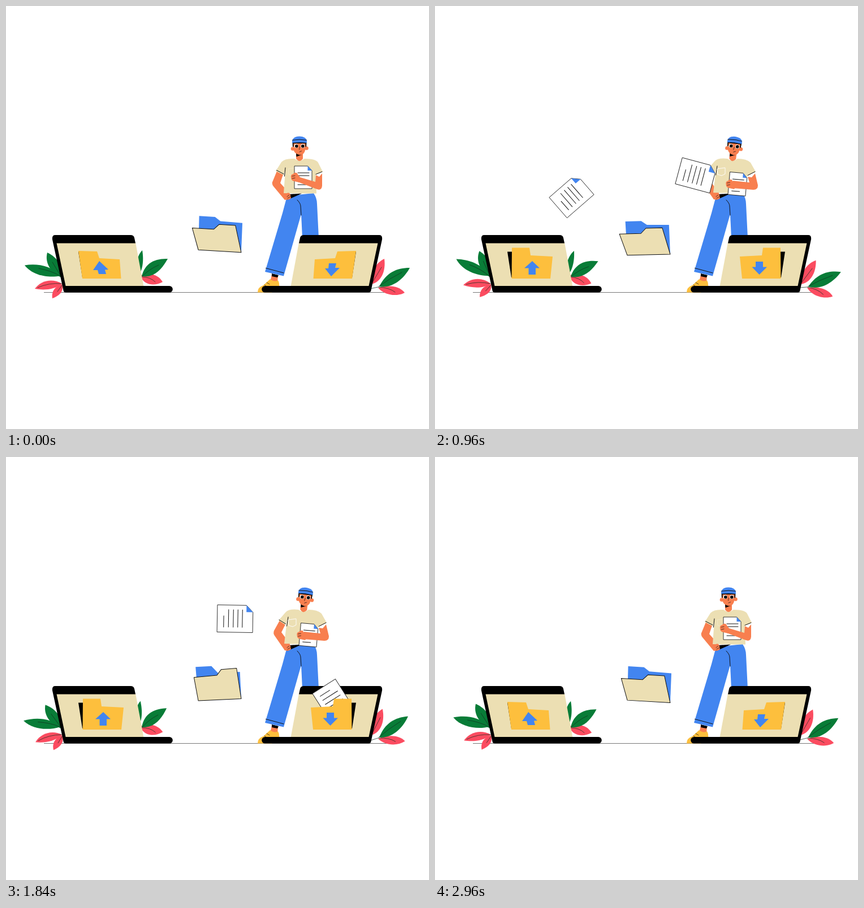
These frames come from a looping animation (748 by 748 pixels, 3040 ms). An HTML page:

```html
<!DOCTYPE html>
<html lang="en">
<head>
<meta charset="utf-8">
<title>File transfer</title>
<style>
  html, body { margin: 0; width: 100%; height: 100%; overflow: hidden; background: #fff; }
  svg { display: block; width: 100%; height: 100%; }
  .green { fill: #087c37; }
  .pink { fill: #fb4c60; }
  .blue { fill: #4285f0; }
  .yellow { fill: #fdbf3d; }
  .sand { fill: #ecdfb3; }
  .skin { fill: #f87f4f; }
  .paper { fill: #fff; stroke: #222; stroke-width: .9; stroke-linejoin: round; }
  .line { fill: none; stroke: #111; stroke-width: 1; stroke-linecap: round; stroke-linejoin: round; }
  .thin { stroke-width: .7; }
  .rib { fill: none; stroke: #12301f; stroke-width: .7; stroke-linecap: round; }
  #hoverFront { fill: #ecdfb3; }
</style>
</head>
<body>
<svg viewBox="0 0 748 748" xmlns="http://www.w3.org/2000/svg">
  <defs>
    <clipPath id="slots"><path d="M0 0H748V438H611V481H136V438H0Z"/></clipPath>
    <g id="laptop">
      <path class="sand" d="M88 418H229L243.500 496H104Z"/>
      <path d="M87 405H220Q226 405 227 410L229 419.500H89.500L105.500 495H289A5.800 5.800 0 0 1 289 506.600H106Q102 506.600 101.500 503L82 413Q81 405 87 405Z"/>
    </g>
    <path id="folderBack" d="M128 434.500H158L163 449L198 451L201 480H135Z"/>
    <g id="sheet">
      <path class="paper" d="M-31.500 -24H20L31.500 -12V24H-31.500Z"/>
      <path class="blue" d="M20 -24L31.500 -12H20Z"/>
      <path class="line" d="M-20 -5V15M-11.500 -16V15M-3 -16V15M5 -16V15M13 -16V15"/>
    </g>
  </defs>

  <path d="M67 506.500H680" fill="none" stroke="#777" stroke-width="1.200"/>

  <g class="leaf" data-sway="7.5,98,480">
    <path class="green" d="M73 436C68 455 80 472 98 480C102 462 92 445 73 436Z"/>
    <path class="rib" d="M82 453L96 476"/>
  </g>
  <g class="leaf" data-sway="11.4,95,478">
    <path class="green" d="M33 458.500C55 455 80 459 96 477C78 481 48 478 33 458.500Z"/>
    <path class="rib" d="M58 464Q80 468 95 477"/>
  </g>
  <g class="leaf" data-sway="8.5,98,490">
    <path class="pink" d="M51 500C62 485 82 481 99 491C86 502 66 503 51 500Z"/>
    <path class="rib" d="M56 498Q76 489 98 491"/>
  </g>
  <g class="leaf" data-sway="7.5,100,492">
    <path class="pink" d="M82 517C80 505 86 496 99 492C103 504 95 512 82 517Z"/>
    <path class="rib" d="M91 505L99 494"/>
  </g>
  <g class="leaf" data-sway="6.5,233,480">
    <path class="green" d="M241 432C233 440 228 455 230 480C242 472 244 450 241 432Z"/>
  </g>
  <g class="leaf" data-sway="4,238,480">
    <path class="pink" d="M277 488C268 473 252 472 238 476C240 490 258 498 277 488Z"/>
    <path class="rib" d="M240 479Q255 479 264 488"/>
  </g>
  <g class="leaf" data-sway="5.5,238,478">
    <path class="green" d="M286 447C262 446 245 456 240 478C262 481 276 465 286 447Z"/>
    <path class="rib" d="M270 458Q252 466 241 478"/>
  </g>
  <g class="leaf" data-sway="6.5,645,492">
    <path class="pink" d="M669 447C653 455 645 470 646 492C664 488 672 468 669 447Z"/>
    <path class="rib" d="M664 462L646 492"/>
  </g>
  <g class="leaf" data-sway="8.8,658,498">
    <path class="pink" d="M705 507C695 494 675 493 658 498C668 511 690 515 705 507Z"/>
    <path class="rib" d="M644 500L658 497Q678 498 688 506"/>
  </g>
  <g class="leaf" data-sway="7.8,658,497">
    <path class="green" d="M714 463C690 463 672 472 660 496C685 500 705 480 714 463Z"/>
    <path class="rib" d="M700 471Q678 482 659 496"/>
  </g>

  <g id="person">
    <path class="skin" d="M470 475L481 478L480 488H467Z"/>
    <path d="M470 473L482 476L480 480L470 478Z"/>
    <path class="yellow" d="M445 506.500Q445 497 455 494L467 483Q475 489 481 485Q484 490 483 499L470 506.500Z"/>
    <path class="line thin" d="M461 489L466 492M457 493L461 496"/>
    <path class="blue" d="M497 336L544 331Q550 340 550 350L553 410H524L522 368L491 477.500L458 470L489 366Z"/>
    <path class="line" d="M459.500 463.500L491 472M515 343Q521 349 521 354L522 370"/>
    <path class="skin" id="hipArm"/>
    <path class="sand" id="shirt"/>
    <path d="M499 333L523 331.500L503 340.500L497 343Z"/>
    <path class="skin" d="M494 333Q500 327 503 334L504 340Q498 345 492 341Z"/>
    <path class="line thin" d="M497 337L501 334M498 340L503 337"/>
    <path class="line" id="seams"/>
    <path id="pocket" d="M499 288L513 286V297L507 300L500 298Z" fill="none" stroke="#fff" stroke-width="1"/>
    <g id="head">
      <path class="skin" d="M513 256H525V270Q519 278 513 270Z"/>
      <path d="M513 259L523 263L513.500 266.500Z"/>
      <circle class="skin" cx="507" cy="252.500" r="3.300"/>
      <circle class="skin" cx="531.500" cy="251.500" r="3.300"/>
      <path d="M506.500 240H531.500L531 249H507Z"/>
      <path class="skin" d="M508.500 243H529.500V253Q528 263 520 263.500Q510 262 508.500 254Z"/>
      <path class="blue" d="M506 242Q505 231 519 230.500Q533 231 532 242Q519 240.500 506 242Z"/>
      <path class="line" d="M506.500 237.200Q519 235 531.500 237.200"/>
      <circle cx="513.200" cy="247.600" r="3.500" fill="#fff"/>
      <circle cx="524.800" cy="247.600" r="3.500" fill="#fff"/>
      <circle cx="513.800" cy="247.800" r="2.800"/>
      <circle cx="524.800" cy="247.800" r="2.800"/>
      <path class="line thin" d="M510 242.500H515M523 242.500H528M519.500 249L518.500 254M519 258L522.500 256.500"/>
    </g>
    <g id="held">
      <path class="paper" d="M510 283H533.500L541 291V323H510Z"/>
      <path class="blue" d="M533.500 283L541 291H533.500Z"/>
      <path class="line" d="M516 295H536M516 300H536M516 316H530"/>
    </g>
    <path class="skin" id="holdArm"/>
    <g id="hand">
      <path class="skin" d="M520 303L514 295Q509 294 508 297Q503 298 504 303Q504 309 510 310L519 312Z"/>
      <path class="line thin" d="M506 301L511 300M506 305L511 304"/>
    </g>
  </g>

  <use href="#laptop"/>
  <use href="#laptop" transform="translate(747) scale(-1 1)"/>

  <use href="#folderBack"/>
  <use href="#folderBack" transform="translate(747) scale(-1 1)"/>
  <g id="sheets" clip-path="url(#slots)"></g>
  <path class="yellow" id="frontL"/>
  <path class="yellow" id="frontR" transform="translate(747) scale(-1 1)"/>
  <path class="blue" id="arrowL"/>
  <path class="blue" id="arrowR"/>

  <g id="hover">
    <path class="blue" id="hoverBack"/>
    <path class="line" id="hoverFront"/>
  </g>
</svg>
<script>
const LOOP = 3040, STEP = 80;
const $ = id => document.getElementById(id);
const mix = (a, b, p) => a + (b - a) * p;

function ease(t, from, to) {
  const u = Math.min(1, Math.max(0, (t - from) / (to - from)));
  return u * u * (3 - 2 * u);
}

// Blends two paths that share the same commands.
function morph(id, a, b, p) {
  const ends = b.match(/-?[\d.]+/g);
  let i = 0;
  $(id).setAttribute('d', a.replace(/-?[\d.]+/g, n => mix(+n, +ends[i++], p).toFixed(2)));
}

function place(el, value) { el.setAttribute('transform', value); }

// Flight of one sheet: time, x, y, angle
const flight = [
  [-300, 166, 478, -62], [-200, 168, 476, -60], [0, 222, 353, -43],
  [50, 241.5, 336, -41], [85, 264, 320, -34.5], [265, 405, 286, 1],
  [320, 461.5, 299.5, 15], [450, 543.5, 364.5, 42], [565, 579, 432, 57.5],
  [665, 583.5, 458, 65], [800, 585, 494, 70]
];
const launches = [640, 910, 1275, 1575];

function slope(i, k) {
  const a = flight[Math.max(0, i - 1)], b = flight[Math.min(flight.length - 1, i + 1)];
  return (b[k] - a[k]) / (b[0] - a[0]);
}

function flightAt(t) {
  const i = Math.max(0, flight.findIndex((key, n) => n && t <= key[0]) - 1);
  const a = flight[i], b = flight[i + 1], d = b[0] - a[0], u = (t - a[0]) / d;
  return [1, 2, 3].map(k =>
    a[k] * (1 + 2 * u) * (1 - u) ** 2 + b[k] * u * u * (3 - 2 * u) +
    d * (slope(i, k) * u * (1 - u) ** 2 + slope(i + 1, k) * u * u * (u - 1)));
}

const sheets = launches.map(() => {
  const use = document.createElementNS('http://www.w3.org/2000/svg', 'use');
  use.setAttribute('href', '#sheet');
  return $('sheets').appendChild(use);
});

const leaves = [...document.querySelectorAll('.leaf')].map(el => {
  const [amp, x, y] = el.dataset.sway.split(',').map(Number);
  return { el, amp, x, y };
});

function drawSheets(t) {
  sheets.forEach((el, i) => {
    const age = t - launches[i];
    const flying = age >= -230 && age <= 800;
    el.style.display = flying ? '' : 'none';
    if (!flying) return;
    const [x, y, angle] = flightAt(age);
    place(el, `translate(${x} ${y}) rotate(${angle})`);
  });
}

function drawScreenFolders(t) {
  const left = ease(t, 80, 380) - ease(t, 1860, 2220);
  const right = ease(t, 640, 940) - ease(t, 2020, 2460);
  const shut = 'M128 433L161 434L165 446L201 448L203.500 482L135 482Z';
  const open = 'M136 427.500L167 427.500L169 441L208 443L204 482L135.500 482Z';
  morph('frontL', shut, open, left);
  morph('frontR', shut, open, right);
  morph('arrowL', 'M165 451L181 466L175 466.500L177 474L164 474L162 467L154 467Z',
    'M172 451L185 463.500L178 463.500L178 475L165.500 475L165.500 463.500L158 463.500Z', left);
  morph('arrowR', 'M575 478L590 463L582 463L584 455L571 455L570 464L564 464Z',
    'M573.500 475L587 461.500L580 461.500L580 452L567 452L567 461.500L560.500 461.500Z', right);
}

function drawHover(t, wave) {
  const phase = t % (LOOP / 2);
  const open = 1 - ease(phase, 60, 380) + ease(phase, 720, 950);
  const tilt = 3.4 * Math.cos(t / LOOP * 2 * Math.PI);
  place($('hover'), `translate(378 ${433.5 + 7 * wave}) rotate(${tilt})`);
  morph('hoverBack', 'M-40 -60L-12 -60L-1 -47L38 -47L38 0L-38 0Z',
    'M-40 -60L-12 -60L-2 -53L37 -52L38 0L-38 0Z', open);
  morph('hoverFront', 'M-43 -42L-2 -44L6 -54L33 -55L38 0L-38 0Z',
    'M-51 -38L-13 -38L-4 -47L25 -47L38 0L-38 0Z', open);
}

function drawPerson(t) {
  const p = ease(t, 80, 600) - ease(t, 1860, 2340);
  place($('head'), `translate(${7 * p} 0) rotate(${7 * p} 518 272)`);
  place($('held'), `translate(${11.5 * p} ${10.5 * p}) rotate(${5 * p} 510 283)`);
  place($('hand'), `translate(${10.5 * p} ${12 * p})`);
  $('pocket').style.opacity = mix(.25, .9, p);
  morph('shirt',
    'M510 270Q493 269 487 276L477 292L491 299L494 290L491 331L549 331.500L548 298L560 293L552 277Q548 270 528 270Q519 277 510 270Z',
    'M517 270Q500 268 494 275L482 289L494 297L497 288L492 330L548 332L552 300L567 293L558 277Q551 270 535 270Q526 277 517 270Z', p);
  morph('seams', 'M478.500 290.500L491 297M494 286L492.500 301M548 297.500L559 293',
    'M483 288L494.500 295M499 283L496.500 299M553 299.500L566 293', p);
  morph('hipArm',
    'M479 292L490 298L485 313L502 332L503 340L493 343L473 319Q469 314 472 309Z',
    'M484 289L494 296L487 310L502 330L502 338L493 342L475 316Q472 312 474 307Z', p);
  morph('holdArm',
    'M548 299L554 302L559 296L559 318Q558 327 550 324L516 311L517 302L547 311Z',
    'M553 302L560 303L566 296L571 317Q571 325 563 325L526 322L527 309L556 312Z', p);
}

function draw(t) {
  const wave = Math.sin(t / LOOP * 2 * Math.PI);
  for (const { el, amp, x, y } of leaves) place(el, `rotate(${amp * wave} ${x} ${y})`);
  drawPerson(t);
  drawScreenFolders(t);
  drawSheets(t);
  drawHover(t, wave);
}

const start = performance.now();
function tick() {
  const t = (performance.now() - start) % LOOP;
  draw(Math.floor(t / STEP) * STEP);
  requestAnimationFrame(tick);
}
tick();
</script>
</body>
</html>
```
